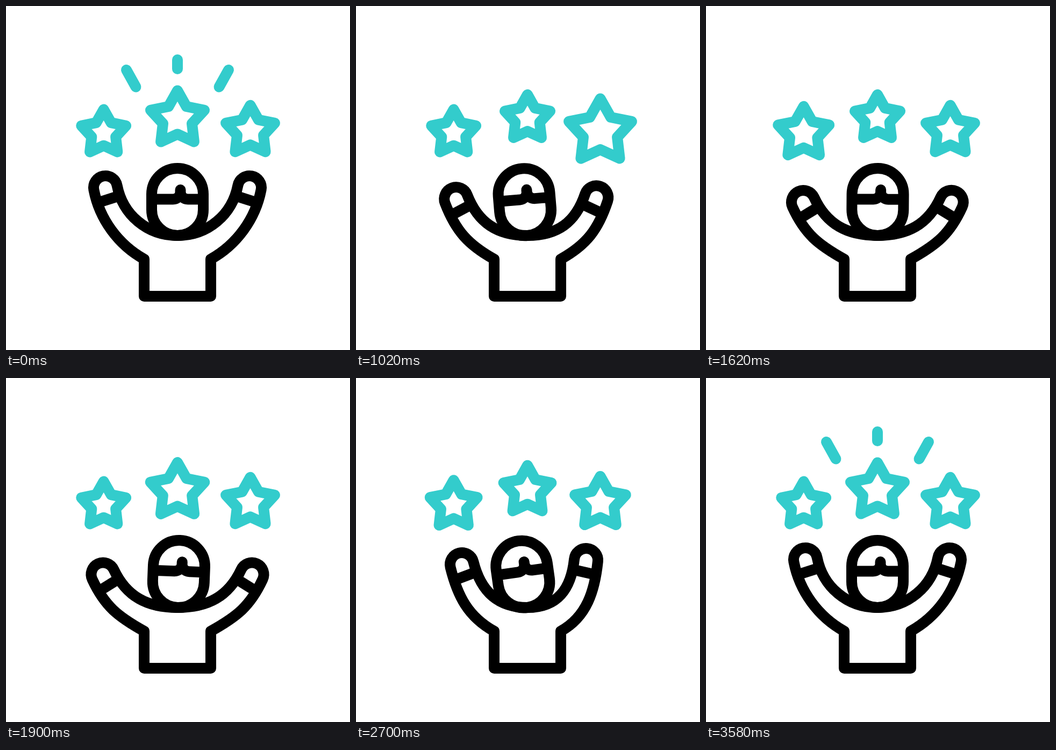
An HTML page with a canvas that plays this animation: 640x640 px, repeating every 3.6 s.

```html
<!DOCTYPE html>
<html lang="en">
<head>
<meta charset="utf-8">
<title>Cheering person with stars</title>
<style>
  html, body { margin: 0; height: 100%; overflow: hidden; background: #fff; }
  canvas { display: block; }
</style>
</head>
<body>
<canvas id="stage" width="640" height="640"></canvas>
<script>
const ctx = document.getElementById('stage').getContext('2d');
const LOOP = 3600, MID = 319, TEAL = '#33cccc';
const FINALE = 3020; // all stars swell together

const STARS = [
  { x: MID, y: 205, rest: 52.6, low: 44.2, peaks: [600, 2085] },
  { x: 181.7, y: 232, rest: 43.6, low: 43.6, peaks: [1400] },
  { x: 454.5, y: 228, rest: 47.8, low: 47.8, peaks: [1010, 2385] }
];

// Hand poses of the left arm; the right arm is mirrored
const UP = { x: 185, y: 338, tilt: -11 };
const DOWN = { x: 180.5, y: 365.5, tilt: -25 };
const IN_LEFT = { x: 197, y: 347, tilt: -14 };
const IN_RIGHT = { x: 210, y: 339, tilt: -6 };

const HEAD = new Path2D('M271 350a48 48 0 0 1 96 0v29a48 48 0 0 1-96 0z' +
  'M271 359.5H310.5a14 14 0 0 0 14-14V342v3.5a14 14 0 0 0 14 14H367');

const mix = (a, b, u) => a + (b - a) * u;
const progress = (t, from, to) => Math.min(1, Math.max(0, (t - from) / (to - from)));

function ease(t, from, to) {
  const u = progress(t, from, to);
  return u * u * (3 - 2 * u);
}

const pulse = (t, peak, rise, fall) =>
  t < peak ? ease(t, peak - rise, peak) : 1 - ease(t, peak, peak + fall);

function polyline(...points) {
  ctx.beginPath();
  for (const point of points) ctx.lineTo(...point);
  ctx.stroke();
}

function drawStar({ x, y, rest, low, peaks }, t) {
  const base = t < peaks[0] || t > FINALE ? rest : low;
  const swell = Math.max(pulse(t, FINALE, 420, 560), ...peaks.map(p => pulse(t, p, 370, 370)));
  const r = mix(base, 61.5, swell), cy = y + r * 0.0955;
  ctx.beginPath();
  for (let i = 0; i < 10; i++) {
    const a = i * Math.PI / 5, d = i % 2 ? r * 0.54 : r;
    ctx.lineTo(x + d * Math.sin(a), cy - d * Math.cos(a));
  }
  ctx.closePath();
  ctx.stroke();
}

// Rays shrink to their outer ends, later shoot out from the inner ends
function drawRays(t) {
  const from = t > LOOP / 2 ? 1 - ease(t, 3080, 3500) : 0;
  const to = t > LOOP / 2 ? 1 : 1 - ease(t, 220, 620);
  if (to - from < 0.001) return;
  for (const side of [-1, 0, 1]) {
    const x = MID + side * 95, y = side ? 119 : 100;
    const dx = side * -17.5, dy = side ? 31.5 : 17;
    polyline([x + dx * from, y + dy * from], [x + dx * to, y + dy * to]);
  }
}

function drawArm(inward, t) {
  const away = ease(t, 340, 990) - ease(t, 2700, 3440);
  const lowered = t < 1900 ? 1 - (1 - progress(t, 480, 1900)) ** 2.2 : 1 - ease(t, 1900, 2700);
  const pose = key => mix(UP[key], mix(inward[key], DOWN[key], lowered), away);
  const x = pose('x'), y = pose('y'), tilt = pose('tilt') * Math.PI / 180;
  const c = Math.cos(tilt), s = Math.sin(tilt);
  const at = (px, py) => [x + px * c - py * s, y + px * s + py * c];
  ctx.beginPath();
  ctx.moveTo(MID, 540);
  ctx.lineTo(257, 540);
  ctx.lineTo(257, 471);
  ctx.bezierCurveTo(208.5, 444, ...at(-22, 55), ...at(-22, 0));
  ctx.arc(x, y, 22, Math.PI + tilt, 2 * Math.PI + tilt);
  ctx.bezierCurveTo(...at(22, 56), 263, 427, MID, 427);
  ctx.stroke();
  ctx.lineCap = 'butt';
  polyline(at(-17, 24.5), at(21, 20));
  ctx.lineCap = 'round';
}

function drawHead(t) {
  const tilt = -4.8 * ease(t, 270, 1050) + 7 * ease(t, 1050, 1900) -
    10.2 * ease(t, 1900, 2700) + 8 * ease(t, 2700, 3440);
  ctx.save();
  ctx.translate(MID, 427);
  ctx.rotate(tilt * Math.PI / 180);
  ctx.translate(-MID, -427);
  ctx.stroke(HEAD);
  ctx.restore();
}

function draw() {
  const t = performance.now() % LOOP;
  ctx.fillStyle = '#fff';
  ctx.fillRect(0, 0, 640, 640);
  ctx.lineWidth = 20;
  ctx.lineCap = ctx.lineJoin = 'round';
  ctx.strokeStyle = TEAL;
  drawRays(t);
  STARS.forEach(star => drawStar(star, t));
  ctx.strokeStyle = '#000';
  drawHead(t);
  drawArm(IN_LEFT, t);
  ctx.save();
  ctx.translate(2 * MID, 0);
  ctx.scale(-1, 1);
  drawArm(IN_RIGHT, t);
  ctx.restore();
  requestAnimationFrame(draw);
}
draw();
</script>
</body>
</html>
```
